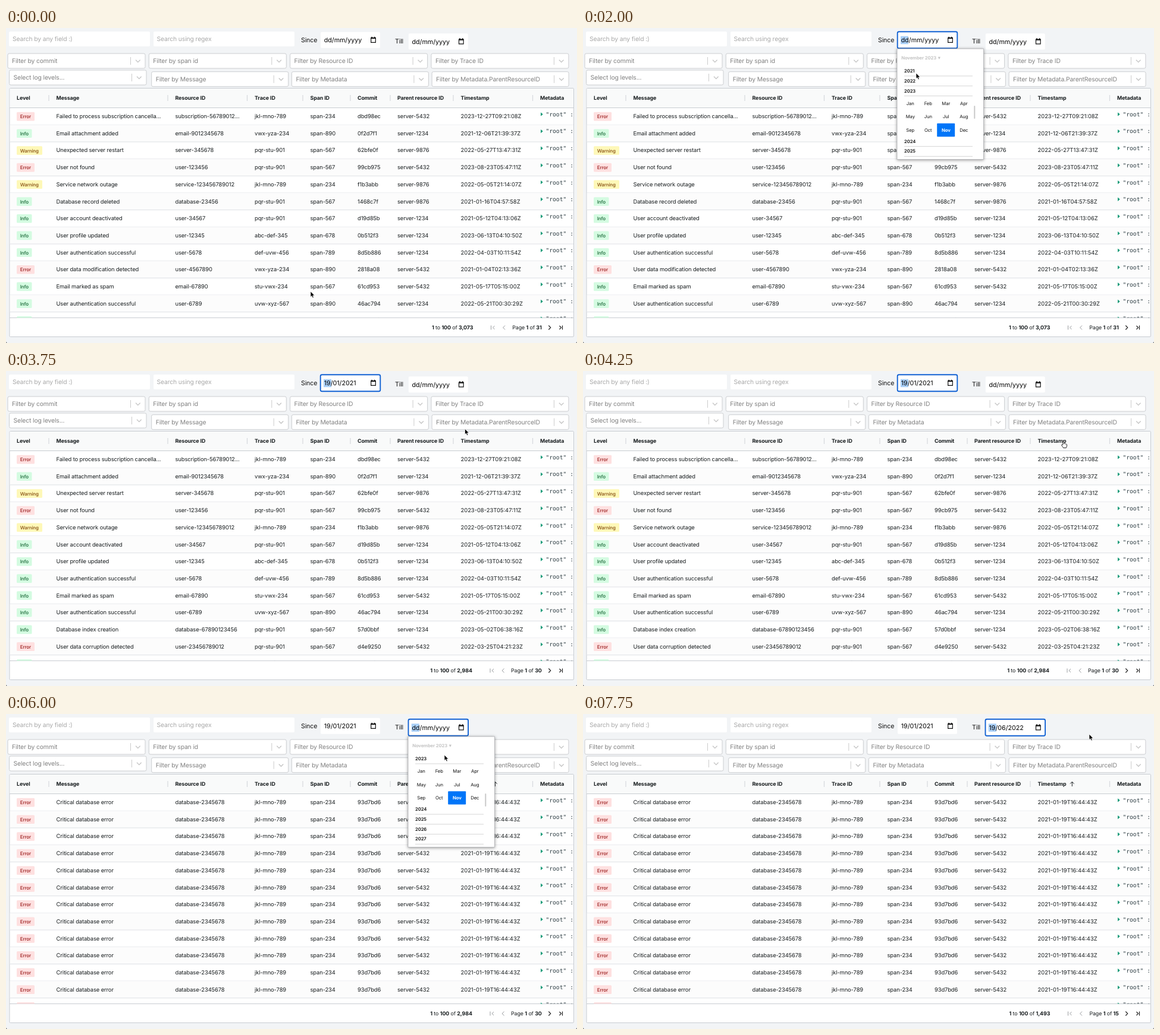
An HTML page that plays this animation: 960 by 531 pixels, repeating every 8000 ms.

```html
<!DOCTYPE html>
<html lang="en">
<head>
<meta charset="utf-8">
<title>Log viewer</title>
<style>
  html, body { margin: 0; width: 100%; height: 100%; overflow: hidden; background: #f2f4f6; }
  svg { display: block; width: 960px; height: 531px; }
  text { font-family: Inter, sans-serif; letter-spacing: -.012em; white-space: pre; text-rendering: geometricPrecision; }
  .b { font-weight: 700; }
  .date { letter-spacing: 0; }
  .mono { font-family: "DejaVu Sans Mono", monospace; letter-spacing: 0; }
  .pop { filter: drop-shadow(0 1.5px 2.5px rgba(0, 0, 0, .4)); }
</style>
</head>
<body>
<svg id="stage" viewBox="0 0 960 531">
  <defs>
    <clipPath id="grid"><rect x="6.5" y="102" width="947.5" height="386.5"/></clipPath>
    <clipPath id="list"><rect x="2" y="28" width="142" height="155"/></clipPath>
  </defs>
  <g id="base"></g><g id="table"></g><g id="dates"></g><g id="popup"></g><g id="cursor"></g>
</svg>
<script>
const STEP = 250, LOOP = 8000, ROW = 28.68, INK = '#181d1f', BLUE = '#0075f8';
const COLS = [18, 84.5, 284.5, 418, 511.5, 591, 658, 764.5, 898];
const HEADS = ['Level', 'Message', 'Resource ID', 'Trace ID', 'Span ID', 'Commit', 'Parent resource ID', 'Timestamp', 'Metadata'];
const MONTHS = ['January', 'February', 'March', 'April', 'May', 'June', 'July', 'August', 'September', 'October', 'November', 'December'];
const BADGES = {
  Error: [30, '#fee0e0', '#9b1c1c'],
  Info: [25.5, '#d4fbe1', '#166534'],
  Warning: [43, '#fef8b8', '#854d0e']
};

const LOGS = `Error|Failed to process subscription cancella...|subscription-56789012...|jkl-mno-789|span-234|dbd98ec|server-5432|2023-12-27T09:21:08Z
Info|Email attachment added|email-9012345678|vwx-yza-234|span-890|0f2d7f1|server-1234|2021-12-06T21:39:37Z
Warning|Unexpected server restart|server-345678|pqr-stu-901|span-567|62bfe0f|server-9876|2022-05-27T13:47:31Z
Error|User not found|user-123456|pqr-stu-901|span-567|99cb975|server-5432|2023-08-23T05:47:11Z
Warning|Service network outage|service-123456789012|jkl-mno-789|span-234|f1b3abb|server-9876|2022-05-05T21:14:07Z
Info|Database record deleted|database-23456|pqr-stu-901|span-567|1468c7f|server-9876|2021-01-16T04:57:58Z
Info|User account deactivated|user-34567|pqr-stu-901|span-567|d19d85b|server-1234|2021-05-12T04:13:06Z
Info|User profile updated|user-12345|abc-def-345|span-678|0b512f3|server-1234|2023-06-13T04:10:50Z
Info|User authentication successful|user-5678|def-uvw-456|span-789|8d5b886|server-1234|2022-04-03T10:11:54Z
Error|User data modification detected|user-4567890|vwx-yza-234|span-890|2818a08|server-5432|2021-01-04T02:13:36Z
Info|Email marked as spam|email-67890|stu-vwx-234|span-567|61cd953|server-5432|2021-05-17T05:15:00Z
Info|User authentication successful|user-6789|uvw-xyz-567|span-890|46ac794|server-1234|2022-05-21T00:30:29Z
Info|Database index creation|database-67890123456|pqr-stu-901|span-567|57d0bbf|server-1234|2023-05-02T06:38:16Z
Error|User data corruption detected|user-23456789012|pqr-stu-901|span-567|d4e9250|server-5432|2022-03-25T04:21:23Z
Info|User profile updated|user-12345|abc-def-345|span-678|0b512f3|server-1234|2022-08-11T08:02:41Z`
  .split('\n').map(line => line.split('|'));
const SINCE = LOGS.filter(row => row[7] >= '2021-01-19');
const SORTED = Array(13).fill('Error|Critical database error|database-2345678|jkl-mno-789|span-234|93d7bd6|server-5432|2021-01-19T16:44:43Z'.split('|'));

// Drawing helpers; text is centred vertically on cy
const text = (x, cy, s, size = 9.4, fill = INK, extra = '') =>
  `<text x="${x}" y="${cy + size * .33}" font-size="${size}" fill="${fill}" ${extra}>${s}</text>`;
const rect = (x, y, w, h, fill, extra = '') =>
  `<rect x="${x}" y="${y}" width="${w}" height="${h}" fill="${fill}" ${extra}/>`;
const path = (d, stroke, width = 1, extra = '') =>
  `<path d="${d}" fill="none" stroke="${stroke}" stroke-width="${width}" ${extra}/>`;
const at = (x, y, body, extra = '') => `<g transform="translate(${x} ${y})" ${extra}>${body}</g>`;
const MID = 'text-anchor="middle"', END = 'text-anchor="end"', BOLD = 'class="b"', DATE = 'class="date"';

function select(x, y, w, label) {
  const r = x + w;
  return rect(x, y, w, 25, '#fff', 'stroke="#cbcdd0" rx="2.5"') +
    text(x + 7, y + 12.7, label, 10.35, '#808080') +
    path(`M${r - 24.5} ${y + 6}v13`, '#ccc') +
    path(`M${r - 16} ${y + 10.8}l3.8 3.8 3.8 -3.8`, '#c4c4c4', 1.3);
}

function base() {
  let s = rect(0, 0, 960, 531, '#f2f4f6');
  s += rect(5, 6, 237, 25, '#fff', 'rx="2"') + text(11, 18.5, 'Search by any field :)', 10.35, '#a9a9a9');
  s += rect(248, 6, 237, 25, '#fff', 'rx="2"') + text(253.5, 18.5, 'Search using regex', 10.35, '#a9a9a9');
  s += text(496, 20.5, 'Since', 10.6, '#111') + text(654, 23, 'Till', 10.6, '#111');
  ['commit', 'span id', 'Resource ID', 'Trace ID'].forEach((name, i) => {
    s += select(3 + i * 237.3, 43, 231, 'Filter by ' + name);
  });
  s += select(5.5, 71, 230.5, 'Select log levels...');
  ['Message', 'Metadata', 'Metadata.ParentResourceID'].forEach((name, i) => {
    s += select(244.7 + i * 235.7, 73.7, 230, 'Filter by ' + name);
  });
  s += rect(6, 101.5, 948.5, 419, '#fff', 'stroke="#c8ccd1" rx="1.5"') + rect(6.5, 102, 947.5, 32.5, '#f9fafa');
  s += path('M6 134.5H954M6 488.5H954', '#c8ccd1');
  HEADS.forEach((name, i) => s += text(COLS[i], 118.2, name, 8.9, INK, BOLD));
  [72, 272, 405.5, 499, 579, 646, 752, 885.5].forEach(x => s += path(`M${x} 113v10`, '#d5d8dc', 1.2));
  return s + '<path d="M0 528.5Q.3 531 2.5 531H0zM960 528.5Q959.7 531 957.5 531H960z" fill="#444"/>';
}

function table(rows, count, pages, dx, sorted) {
  let s = '';
  rows.slice(0, 13).forEach((row, i) => {
    const cy = 149 + i * ROW, [w, bg, ink] = BADGES[row[0]];
    if (i % 2) s += rect(6.5, cy - 14.3, 947.5, ROW, '#fcfcfc');
    s += path(`M6 ${cy + 14.3}H954`, '#dee1e5');
    s += rect(18, cy - 7.2, w, 14.6, bg, 'rx="1.5"') + text(23.7, cy + .5, row[0], 8, ink, 'font-weight="500"');
    for (let c = 1; c < 8; c++) s += text(COLS[c], cy, row[c], 9.4, INK, c === 7 ? DATE : '');
    s += `<path d="M899 ${cy - 6.8}l3.8 3.2 -3.8 3.2z" fill="#159b78"/>`;
    s += text(907.4, cy - 3.4, '"root" : {', 9.68, '#2c3c42', 'class="mono"');
  });
  s = `<g clip-path="url(#grid)">${s}</g>`;
  if (sorted) s += path('M822.3 122v-7.6M819 117.6l3.3 -3.3 3.3 3.3', INK);
  const bold = v => `<tspan class="b">${v}</tspan>`;
  s += text(785.3 + dx, 505, `${bold(1)} to ${bold(100)} of ${bold(count)}`, 8.9, INK, END);
  s += text(900.7, 505, `Page ${bold(1)} of ${bold(pages)}`, 8.9, INK, END);
  s += path(`M${815.5 + dx} 501.5v7M${821.5 + dx} 502l-3 3 3 3M${839 + dx} 501.5l-3.4 3.5 3.4 3.5`, '#9a9da0');
  return s + path('M912.3 501.5l3.4 3.5 -3.4 3.5M930.5 502l3 3 -3 3M935.5 501.5v7', '#222', 1.2);
}

function dateField(x, y, value, focus) {
  let s = focus
    ? rect(-.3, -.5, 100.6, 28, '#fff', 'stroke="#1262d3" stroke-width="1.9" rx="2.5"') + rect(5, 7, 13, 13.5, '#a9cff8')
    : rect(0, 0, 100, 27, '#fff', 'rx="2"');
  s += text(5.7, 13.7, value, 10.7, '#000', DATE);
  s += path('M84.7 9.8h7.6v7.8h-7.6z', '#111', 1.2) + path('M84.3 10.6h8.4M86.2 8v2M90.8 8v2', '#111', 1.6);
  return at(x, y, s);
}

const title = (y, m, fill) =>
  text(7.2, 15, `${MONTHS[m]} ${y}<tspan font-size="8.5" font-family="DejaVu Sans, sans-serif"> ▾</tspan>`, 7.6, fill, BOLD);

function calendar(y, m, day = 19) {
  let s = title(y, m, '#000');
  s += path('M107.5 21v-11M102.8 14.6l4.7 -4.7 4.7 4.7M128.7 9.5v11M124 15.9l4.7 4.7 4.7 -4.7', '#222');
  [...'SMTWTFS'].forEach((d, i) => s += text(16.7 + i * 18.65, 39.5, d, 7.6, '#222', MID + ' font-weight="500"'));
  const first = 1 - new Date(Date.UTC(y, m, 1)).getUTCDay();
  for (let i = 0; i < 42; i++) {
    const d = new Date(Date.UTC(y, m, first + i)), inside = d.getUTCMonth() === m;
    const x = 16.7 + i % 7 * 18.65, cy = 58.8 + Math.floor(i / 7) * 18.65, on = inside && d.getUTCDate() === day;
    if (on) s += rect(x - 9.3, cy - 9.5, 18.6, 18.6, BLUE, 'rx="1"');
    s += text(x, cy, d.getUTCDate(), 7.7, on ? '#fff' : inside ? '#000' : '#7c7c7c', MID + (on ? ' ' + BOLD : ''));
  }
  return s + text(14.5, 173, 'Clear', 7.7, '#0b67d0') + text(131, 173, 'Today', 7.7, '#0b67d0', END);
}

function picker(top, open) {
  let s = '';
  for (let y = top, cy = 37.4; cy < 186; y++, cy += 16.8) {
    s += text(12, cy, y, 7.7, '#111', 'font-weight="600"') + path(`M12 ${cy + 8.5}H127`, '#ccc', .8);
    if (y !== open) continue;
    MONTHS.forEach((name, i) => {
      const x = 22.3 + i % 4 * 30, my = cy + 21 + Math.floor(i / 4) * 22.6, on = y === 2023 && i === 10;
      if (on) s += rect(x - 15.1, my - 11.4, 30, 22.4, BLUE, 'rx="1"');
      s += text(x, my, name.slice(0, 3), 7.7, on ? '#fff' : '#111', MID + (on ? ' ' + BOLD : ''));
    });
    cy += 68.3;
  }
  return title(2023, 10, '#c4c4c4') + `<g clip-path="url(#list)">${s}</g>` + rect(129.3, 96, 2, 22, '#c9c9c9', 'rx="1"');
}

const popup = (x, y, body) =>
  at(x, y, rect(0, 0, 145.5, 186.5, '#fff', 'class="pop" stroke="#aeb0b3" stroke-width=".8"') + body);
const left = body => popup(528, 35, body), right = body => popup(676, 38, body);

function pointer(x, y, hand) {
  return at(x, y, hand
    ? `<path d="M-1.2 4.5V-.6q0-1.1 1-1.1t1 1.1V2.4q1.2-.6 1.8.4 1.2-.4 1.6.6 1.4-.2 1.4 1.2 0 3.2-1.3 5H-.4Q-1.4 7.6-3.4 5.4q-.4-1.4 1-1.2z" fill="#fff" stroke="#111" stroke-width=".9"/>`
    : '<path d="M0 0V9.4L2.1 7.5 3.6 10.9 5.3 10.2 3.9 6.9H6.8Z" fill="#000" stroke="#fff" stroke-width=".7"/>');
}

// Timelines: [first step, value]
const POPUPS = [
  [0, ''],
  [3, left(calendar(2023, 10))],
  [6, left(picker(2023, 2023))],
  [7, left(picker(2022, 2023))],
  [8, left(picker(2021, 2023))],
  [9, left(picker(2021, 2021))],
  [11, left(calendar(2021, 0))],
  [13, ''],
  [22, right(calendar(2023, 10))],
  [24, right(picker(2023, 2023))],
  [25, right(picker(2022, 2023))],
  [27, right(picker(2022, 2022))],
  [29, right(calendar(2022, 5))],
  [31, '']
];
const TABLES = [
  [0, table(LOGS, '3,073', 31, 0)],
  [13, table(SINCE, '2,984', 30, -1.5)],
  [18, table(SORTED, '2,984', 30, -1.5, true)],
  [31, table(SORTED, '1,493', 15, 0, true)]
];
const MOVES = [
  [0, 512, 444], [2, 613, 24], [3, 615, 22], [4, 584, 77], [5, 567, 51], [6, 567, 51], [7, 590, 92],
  [8, 560, 76], [9, 556, 76], [10, 550, 94], [11, 556, 92], [12, 666, 74], [13, 706, 62], [14, 735, 75],
  [16, 808, 120], [18, 808, 120], [20, 766, 26], [21, 762, 23], [22, 762, 23], [23, 722, 53], [24, 737, 69],
  [25, 735, 86], [26, 714, 77], [27, 714, 77], [28, 729, 119], [29, 731, 116], [30, 790, 62], [31, 851, 34]
];
const current = (list, i) => list.filter(k => k[0] <= i).pop();

function cursor(i) {
  const a = current(MOVES, i), b = MOVES[MOVES.indexOf(a) + 1] || a;
  const p = (i - a[0]) / (b[0] - a[0] || 1);
  return pointer(a[1] + (b[1] - a[1]) * p, a[2] + (b[2] - a[2]) * p, i >= 16 && i <= 18);
}

const layer = id => document.getElementById(id);
const shown = {};
function put(id, html) {
  if (shown[id] !== html) layer(id).innerHTML = shown[id] = html;
}

function draw() {
  const i = Math.floor(performance.now() % LOOP / STEP);
  put('table', current(TABLES, i)[1]);
  put('dates',
    dateField(529, 6.7, i < 11 ? 'dd/mm/yyyy' : '19/01/2021', i >= 3 && i < 21) +
    dateField(676.8, 9.3, i < 29 ? 'dd/mm/yyyy' : '19/06/2022', i >= 21));
  put('popup', current(POPUPS, i)[1]);
  put('cursor', cursor(i));
  requestAnimationFrame(draw);
}

put('base', base());
draw();
</script>
</body>
</html>
```
